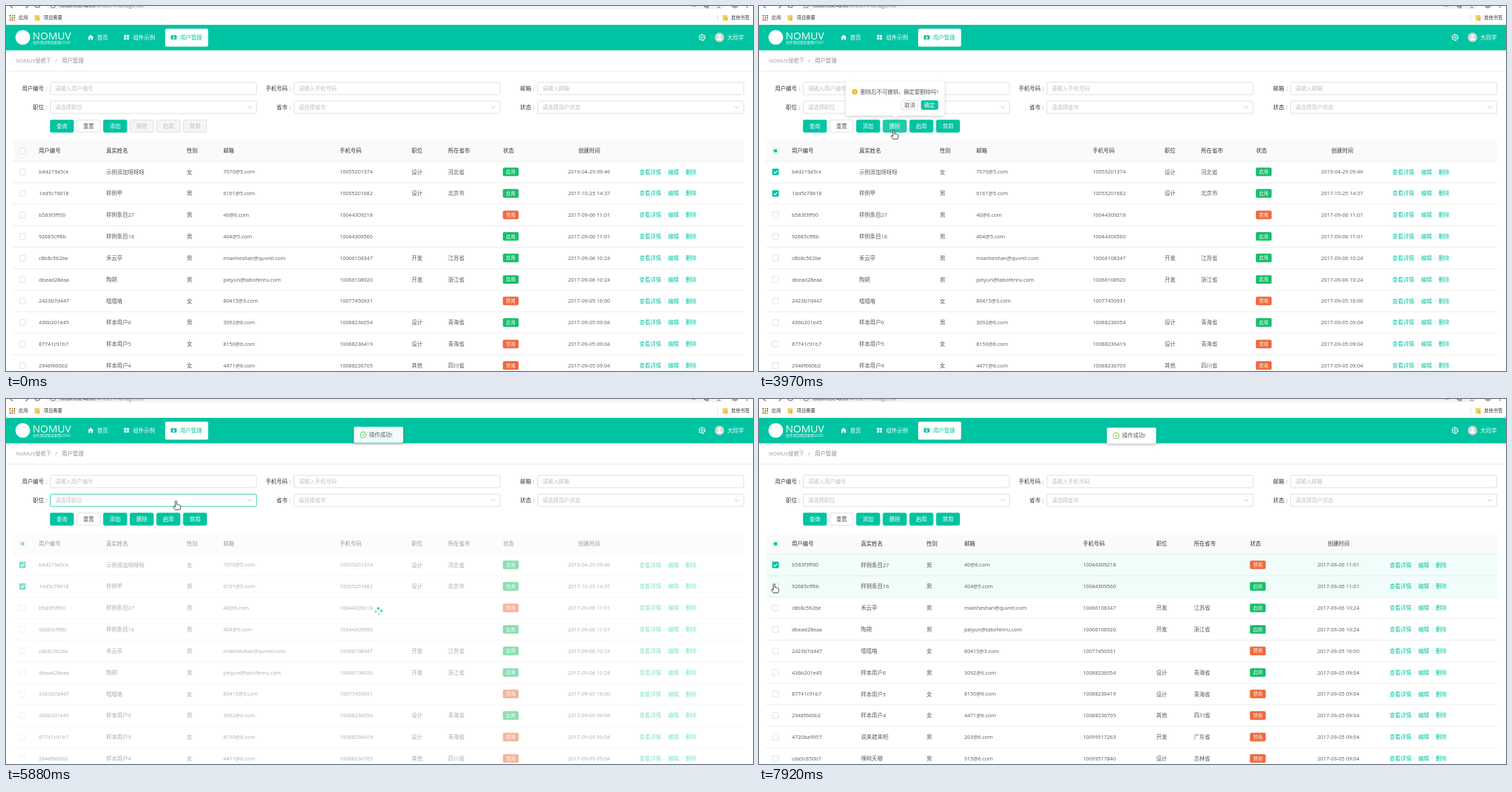
An HTML page for the animation above (7990 ms loop, 1070x523 px).

```html
<!DOCTYPE html>
<html lang="zh-CN">
<head>
<meta charset="utf-8">
<title>用户管理</title>
<style>
html, body { margin: 0; width: 100%; height: 100%; overflow: hidden; background: #fff; }
svg { display: block; width: 100%; height: 100%; }
text { font-family: "Open Sans", "Noto Sans CJK SC", "Noto Sans CJK", sans-serif; white-space: pre; }
</style>
</head>
<body>
<svg id="stage" viewBox="0 0 1070 523" xmlns="http://www.w3.org/2000/svg"></svg>
<script>
const LOOP = 7990, SWAP = 5900;
const GREEN = '#00c4a1', LIGHT = '#2fd0b0', LINE = '#d9d9d9', HINT = '#bfbfbf', INK = '#595959', DARK = '#333';
const PITCH = 30.83, TOP = 222.3;

// Markup helpers
const text = (x, y, s, fill = INK, size, extra = '') => {
  const fs = size || (/^[ -~]+$/.test(s) ? 7.5 : 7.8);
  return `<text x="${x}" y="${y + fs * 0.36}" font-size="${fs}" fill="${fill}" ${extra}>${s}</text>`;
};
const rect = (x, y, w, h, fill, extra = '') =>
  `<rect x="${x}" y="${y}" width="${w}" height="${h}" fill="${fill}" ${extra}/>`;
const box = (x, y, w, h, fill, stroke, extra = '') =>
  rect(x, y, w, h, fill, `rx="2" stroke="${stroke}" stroke-width=".8" ${extra}`);
const dot = (x, y, r, fill, extra = '') => `<circle cx="${x}" cy="${y}" r="${r}" fill="${fill}" ${extra}/>`;
const path = (d, stroke, w = 1, fill = 'none', extra = '') =>
  `<path d="${d}" stroke="${stroke}" stroke-width="${w}" fill="${fill}" ${extra}/>`;
const group = (id, body, extra = '') => `<g id="${id}" ${extra}>${body}</g>`;

function browserBar() {
  const apps = ['#d9534a', '#e8a33d', '#4b9b62'];
  let s = rect(56, -20, 974, 24.5, '#f1f3f4', 'rx="8"');
  s += path('M9.5 3L6 -.5M28.5 3L32 -.5', '#5f6368', 1.1);
  s += path('M41.5 0A3.8 3.8 0 0 0 48.5 0', '#5f6368', 1.1);
  s += dot(67.5, -.8, 3.4, 'none', 'stroke="#5f6368" stroke-width=".9"');
  s += text(77, -.7, 'localhost:4200<tspan fill="#80868b">/#/user-manage/list</tspan>', '#333', 7.5);
  s += path('M982 0h6M1000 .5h6v2h-4zM1018.500 3l2.500-1.800 2.500 1.800', '#5f6368', .9);
  s += dot(1044, -1.5, 5, '#b9a5a0') + dot(1061.500, 1.500, .9, '#5f6368');
  for (let i = 0; i < 9; i++)
    s += rect(5 + i % 3 * 3, 13 + (i / 3 | 0) * 3, 2, 2, apps[(i + (i / 3 | 0)) % 3]);
  s += text(18, 17, '应用', DARK, 6.7) + text(54, 17, '项目需要', DARK, 6.7) + text(1038.500, 17, '其他书签', DARK, 6.7);
  for (const x of [41, 1026.500])
    s += rect(x, 13, 7, 8, '#f5cf66', 'rx=".8"') + rect(x + 4, 16, 3, 5, '#e9b93e', 'rx=".6"');
  return s + rect(1019, 12, .8, 10, '#ddd');
}

function header() {
  const bold = 'font-weight="500"';
  let s = rect(0, 27, 1070, 36.3, GREEN, 'filter="url(#soft)"');
  s += dot(24, 45, 10.5, '#fff');
  s += text(38, 42.3, 'NOMUV', '#fff', 14.7) + text(38.500, 52, '仅作测试项目使用LOGO', '#fff', 5);
  s += path('M117 45.300L121.300 41l4.300 4.300h-1.300v3.500h-2v-2.500h-2v2.500h-2v-3.500z', 'none', 0, '#fff');
  for (let i = 0; i < 4; i++)
    s += rect(169 + i % 2 * 4, 41.500 + (i >> 1) * 3.700, 3.200, 2.900, '#fff');
  s += text(130.500, 45, '首页', '#fff', 7.8, bold) + text(182, 45, '组件示例', '#fff', 7.8, bold);
  s += rect(228, 32.500, 61.500, 25.700, '#fff', 'rx="2"');
  s += rect(236, 42, 8.500, 6, GREEN, 'rx=".8"') + dot(240.200, 44.300, 1, '#fff') + rect(238.700, 45.500, 3, 1.300, '#fff');
  s += text(249.500, 45, '用户管理', GREEN, 7.8, bold);
  s += dot(997, 45, 3.8, 'none', 'stroke="#fff" stroke-width=".9"');
  s += dot(997, 45, 4.6, 'none', 'stroke="#fff" stroke-width="1" stroke-dasharray="2.4 2.417"');
  s += dot(997, 45, 1.500, 'none', 'stroke="#fff" stroke-width=".9"');
  s += dot(1022, 45, 6.700, '#d3d8d7') + dot(1022, 43.200, 1.900, '#fff') + path('M1018.500 48.800a3.500 3.200 0 0 1 7 0z', 'none', 0, '#fff');
  s += text(1033.300, 45, '大同学', '#fff', 7.8, bold);
  s += text(14, 78, 'NOMUV屋檐下', '#999', 7.5) + text(70.500, 78, '/', '#999') + text(80, 78, '用户管理', '#8a8a8a');
  return s + rect(0, 92.800, 1070, .8, '#e4e4e4');
}

const BUTTONS = ['查询', '重置', '添加', '删除', '启用', '禁用'];
const buttonX = i => 63.400 + i * 38.120;
const button = (i, fill, stroke, ink, extra) =>
  box(buttonX(i), 163.300, 33.400, 17.700, fill, stroke, extra) + text(buttonX(i) + 8.900, 172, BUTTONS[i], ink);

function form() {
  const fields = [['用户编号', '手机号码', '邮箱'], ['职位', '省市', '状态']];
  const hints = [['请输入用户编号', '请输入手机号码', '请输入邮箱'], ['请选择职位', '请选择省市', '请选择用户状态']];
  let s = '';
  fields.forEach((names, r) => names.forEach((name, c) => {
    const x = 63.500 + c * 349, y = 118 + r * 27;
    s += text(x - 9.300 - name.length * 7.8, y, name, DARK) + text(x - 6.500, y, ':', DARK);
    s += box(x, y - 8.700, 295.300, 17.700, '#fff', LINE, r + c === 1 && r ? 'id="jobBox"' : '');
    s += text(x + 6.700, y, hints[r][c], HINT);
    if (r) s += path(`M${x + 282.500} ${y - 1.500}l3 3 3-3`, HINT, .9);
  }));
  BUTTONS.slice(0, 3).forEach((b, i) => {
    s += i === 1 ? button(i, '#fff', LINE, INK) : button(i, GREEN, GREEN, '#fff');
  });
  let off = '', on = '';
  for (let i = 3; i < 6; i++) {
    off += button(i, '#f5f5f5', LINE, HINT);
    on += button(i, GREEN, GREEN, '#fff', i === 3 ? 'id="delBox"' : '');
  }
  return s + group('off', off) + group('on', on);
}

// id, name, gender, mail, phone, job, province, status, time
const USERS = `b4d219a5ce,示例添加呀呀呀,女,7070@5.com,10055201374,设计,河北省,1,2019-04-29 09:46
1dd5c78618,样例甲,男,6161@5.com,10055201682,设计,北京市,1,2017-10-25 14:37
b583f3ff00,样例条目27,男,40@6.com,10044309218,,,0,2017-09-06 11:01
92685cff8b,样例条目16,男,404@5.com,10044309560,,,1,2017-09-06 11:01
c8b8c562be,禾云亭,男,mianheshan@quvrel.com,10066108347,开发,江苏省,1,2017-09-06 10:24
dbead28eaa,陶朔,男,peiyun@tabofenru.com,10066108920,开发,浙江省,1,2017-09-06 10:24
2423b7d447,嘻嘻咯,女,80415@3.com,10077450931,,,0,2017-09-05 16:00
436b201e45,样本用户6,男,3092@6.com,10088236054,设计,青海省,1,2017-09-05 09:04
87741c91b7,样本用户5,女,8150@6.com,10088236419,设计,青海省,0,2017-09-05 09:04
2948f660b2,样本用户4,女,4471@6.com,10088236705,其他,四川省,0,2017-09-05 09:04
4720ba9957,说来就来吧,男,203@6.com,10099517263,开发,广东省,0,2017-09-05 09:04
cda5c650b7,咦哟天哪,男,915@6.com,10099517840,设计,吉林省,0,2017-09-05 09:04`
  .split('\n').map(line => line.split(','));
const TITLES = ['用户编号', '真实姓名', '性别', '邮箱', '手机号码', '职位', '所在省市', '状态', '创建时间'];
const rowY = i => TOP + PITCH * (i + .5);

function table(cols, users) {
  const ops = cols[9];
  let s = TITLES.map((h, i) => text(cols[i] + (i === 8 ? 14.800 : 0), 207, h, DARK)).join('');
  users.forEach((u, r) => {
    const y = rowY(r);
    u.forEach((v, c) => {
      if (c !== 7) { s += text(cols[c], y, v); return; }
      s += rect(cols[7] - .3, y - 6.200, 22.600, 12.300, v === '1' ? '#19be6b' : '#f0693c', 'rx="2"');
      s += text(cols[7] + 4.300, y, v === '1' ? '启用' : '禁用', '#fff', 6.7);
    });
    s += text(ops, y, '查看详情', GREEN) + text(ops + 41, y, '编辑', GREEN) + text(ops + 66, y, '删除', GREEN);
    s += rect(ops + 36.300, y - 3.500, .6, 7, '#e2e2e2') + rect(ops + 61.300, y - 3.500, .6, 7, '#e2e2e2');
  });
  return s;
}

function grid() {
  let s = rect(10, 192, 1047, 30.300, '#fafafa');
  for (let i = 0; i < 10; i++) s += rect(10, TOP + PITCH * i, 1047, PITCH, '#e4fcf5', `id="row${i}" opacity="0"`);
  for (let i = 0; i < 10; i++) s += rect(10, TOP + PITCH * i - .4, 1047, .8, '#e6e6e6');
  const frame = (y, id) => rect(19.400, y - 4.200, 8.400, 8.400, '#fff', `rx="1" stroke="${LINE}" stroke-width=".8" id="${id}"`);
  s += frame(207.500, 'boxAll') + rect(21.300, 205.200, 4.600, 4.600, GREEN, 'id="someTick"');
  for (let i = 0; i < 10; i++) s += frame(rowY(i), 'box' + i);
  for (let i = 0; i < 2; i++) {
    const y = rowY(i);
    s += group('tick' + i, rect(19, y - 4.600, 9.200, 9.200, GREEN, 'rx="1"') +
      path(`M21.200 ${y}l1.800 1.900 3.200-3.700`, '#fff', 1.200));
  }
  s += group('before', table([47, 143.500, 259, 311.300, 478, 581, 633.300, 712, 805, 907.300], USERS.slice(0, 10)));
  s += group('after', table([47, 146, 240, 294, 464, 569, 623, 703.500, 799.700, 903.300], USERS.slice(2)));
  return group('grid', s);
}

function spinner() {
  let s = '';
  for (let i = 0; i < 4; i++) s += dot(4, 0, 1.900, GREEN, `id="spin${i}" transform="rotate(${i * 90})"`);
  return group('spinner', s);
}

function popup() {
  let s = path('M124 110a2 2 0 0 1 2-2H264a2 2 0 0 1 2 2V155a2 2 0 0 1-2 2H198.500L195 160.300 191.500 157H126a2 2 0 0 1-2-2z',
    'none', 0, '#fff', 'filter="url(#lift)"');
  s += dot(137, 123, 4, '#f5b92e') + rect(136.600, 120.700, .8, 2.900, '#fff') + rect(136.600, 124.400, .8, .9, '#fff');
  s += text(145, 123, '删除后不可撤销，确定要删除吗?', INK, 7.8);
  s += box(204, 135.500, 23.800, 12.700, '#fff', LINE) + text(208.200, 141.800, '取消');
  s += box(232.500, 135.500, 24, 12.700, GREEN, GREEN, 'id="okBox"') + text(236.700, 141.800, '确定', '#fff');
  return group('popup', s);
}

function toast() {
  const s = rect(498.300, 41, 70.700, 23, '#fff', 'rx="2" filter="url(#lift)"') +
    dot(511.600, 52.500, 4.100, 'none', 'stroke="#52c41a" stroke-width=".9"') +
    path('M509.700 52.600l1.400 1.500 2.500-3', '#52c41a', .9) + text(520.300, 52.500, '操作成功!', INK, 7.8);
  return group('toast', s);
}

function cursors() {
  const hand = 'M-1.100 8.800V1.100a1.100 1.100 0 0 1 2.200 0V5.200q1.600-.6 2 .4 1.400-.4 1.800.6 1.500-.2 1.500 1.200V9.500q0 1.800-1 3.200H-1.200Q-2 11.400-3.600 9.300-4.300 8-3.200 7.600-2.200 7.300-1.100 8.800Z';
  return path('M0 0V9L2 7.200 3.500 10.500 4.900 9.900 3.500 6.700H6.300Z', '#333', .7, '#fff', 'id="arrow"') +
    path(hand, '#222', .85, '#fff', 'id="hand"') ;
}

const stage = document.getElementById('stage');
stage.innerHTML = `<defs>
<filter id="soft" x="-5%" y="-20%" width="110%" height="150%"><feDropShadow dx="0" dy="1.200" stdDeviation="1.300" flood-opacity=".18"/></filter>
<filter id="lift" x="-15%" y="-30%" width="130%" height="170%"><feDropShadow dx="0" dy="1.500" stdDeviation="2.500" flood-opacity=".2"/></filter>
</defs>` + browserBar() + header() + form() + grid() + spinner() + popup() + toast() + cursors();

const nodes = {};
stage.querySelectorAll('[id]').forEach(n => nodes[n.id] = n);
const set = (id, name, value) => nodes[id].setAttribute(name, value);
const show = (id, alpha) => set(id, 'opacity', +alpha);
const ramp = (t, a, b) => Math.min(1, Math.max(0, (t - a) / (b - a)));
const ease = p => 1 - (1 - p) ** 3;
const within = (t, a, b) => t >= a && t < b;

// Pointer path: time, x, y
const PATH = [
  [300, 60, 521], [700, 45, 380], [930, 24, 222], [1000, 22, 214.5], [1080, 22, 226], [1150, 23, 237],
  [2100, 23, 237], [2330, 22.5, 262], [2410, 22.5, 267.5], [2700, 22.5, 267.5],
  [2800, 80, 245], [2880, 140, 221], [2960, 182, 219], [3110, 195.5, 217.5], [3260, 194, 198],
  [3410, 193, 180], [3500, 193, 178], [3980, 193, 178], [4300, 222, 160], [4540, 243.5, 146],
  [6400, 243.5, 146], [6600, 190, 200], [6850, 80, 262], [7040, 30, 250], [7200, 23.5, 237.5],
  [7700, 23.5, 237.5], [7920, 21.8, 265]
];
function pointer(t) {
  if (t < PATH[0][0]) return null;
  const i = PATH.findIndex(k => k[0] > t);
  if (i < 0) return PATH[PATH.length - 1].slice(1);
  const a = PATH[i - 1], b = PATH[i], p = ramp(t, a[0], b[0]);
  return [a[1] + (b[1] - a[1]) * p, a[2] + (b[2] - a[2]) * p];
}
const rowAt = t => {
  const p = pointer(t);
  return p ? Math.floor((p[1] - TOP) / PITCH) : -1;
};

function draw(t) {
  const p = pointer(t);
  const hand = within(t, 1080, 2720) || within(t, 3410, 4060) || within(t, 4440, 6480) || t >= 7120;
  show('hand', p && hand);
  show('arrow', p && !hand);
  if (p) set(hand ? 'hand' : 'arrow', 'transform', `translate(${p})`);

  // Row hover fades over 200 ms
  const glow = Array(10).fill(0);
  for (let k = 0; k < 10; k++) {
    const r = rowAt(t - k * 20);
    if (r >= 0 && r < 10) glow[r] += .1;
  }
  glow.forEach((g, i) => show('row' + i, g));

  const swapped = t >= SWAP;
  show('before', !swapped);
  show('after', swapped);
  const first = swapped ? ramp(t, 7600, 7700) : ramp(t, 1870, 2010);
  show('tick0', first);
  show('tick1', swapped ? 0 : ramp(t, 2650, 2790));
  show('someTick', first);
  set('box0', 'stroke', within(t, 1150, 2250) || t >= 7290 ? GREEN : LINE);
  set('box1', 'stroke', within(t, 2330, 2800) ? GREEN : LINE);

  const enabled = ramp(t, 1870, 2100);
  show('on', enabled);
  show('off', enabled < 1);
  set('delBox', 'fill', within(t, 3500, 5090) ? '#1fcbaa' : GREEN);
  set('okBox', 'fill', t >= 4690 ? LIGHT : GREEN);
  set('jobBox', 'stroke', within(t, 5200, 6480) ? GREEN : LINE);

  const opened = ease(ramp(t, 3820, 4020)), closed = ramp(t, 4950, 5090);
  const zoom = .8 + .2 * opened - .2 * closed;
  show('popup', opened * (1 - closed));
  set('popup', 'transform', `translate(195 160) scale(${zoom}) translate(-195 -160)`);

  const busy = ease(ramp(t, 5180, 5420)) - ease(ramp(t, SWAP, 6190));
  show('grid', 1 - .5 * busy);
  show('spinner', within(t, 5200, SWAP) ? 1 : 0);
  set('spinner', 'transform', `translate(533.7 304) rotate(${35 + (t - 5420) * .3})`);
  for (let i = 0; i < 4; i++) show('spin' + i, .55 + .25 * Math.sin(t / 320 + i * 1.57));

  const drop = ease(ramp(t, 5720, 5980));
  show('toast', drop);
  set('toast', 'transform', `translate(0 ${-23 * (1 - drop)})`);
}

const start = performance.now();
function tick() {
  draw((performance.now() - start) % LOOP);
  requestAnimationFrame(tick);
}
tick();
</script>
</body>
</html>
```
